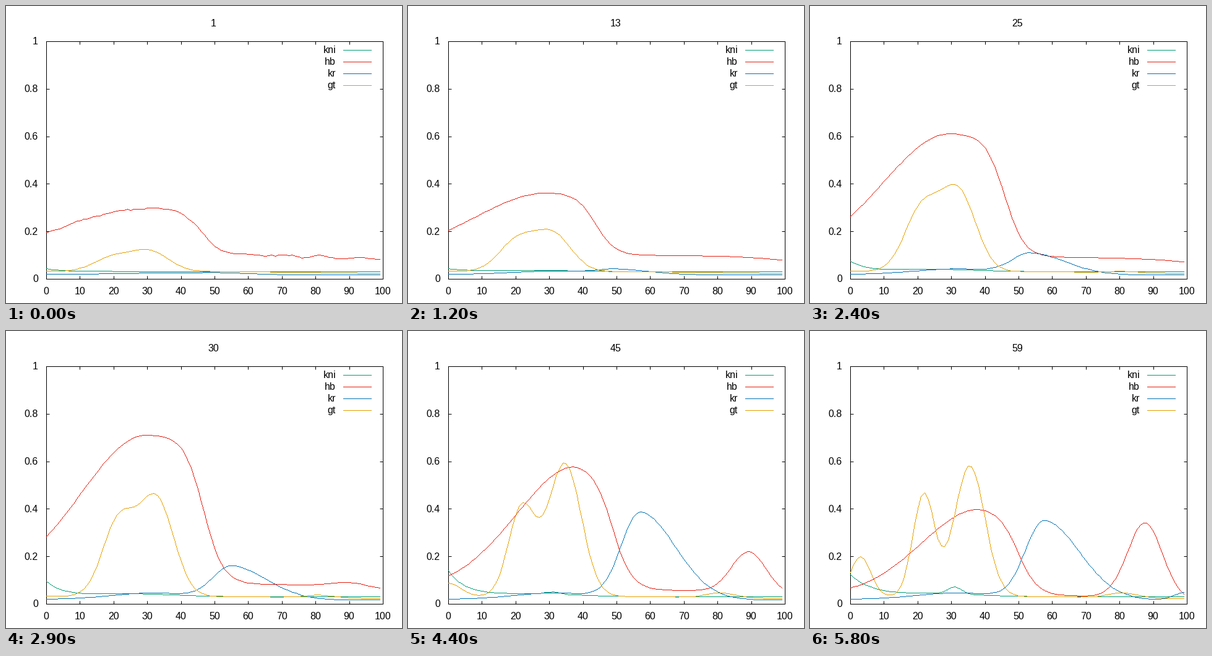
Recreate the animation shown at these times as a matplotlib script. Size 640x480 px, loop 5.9 s.

```python
import numpy as np
import matplotlib.pyplot as plt
from matplotlib.animation import FuncAnimation
from matplotlib.lines import Line2D

W, H, DPI = 640, 480, 100
STEPS, INTERVAL = 59, 100
PX = 72 / DPI
LEFT, RIGHT, TOP, BOTTOM = 65, 609, 57, 441

plt.rcParams.update({"font.family": "Liberation Sans", "font.size": 16 * PX})

X = np.arange(100)
COLORS = {"kni": "#009e73", "hb": "#e51e10", "kr": "#0072b2", "gt": "#e69f00"}

noise = np.random.default_rng(4).normal(0, 0.007, 104)
RIPPLE = np.convolve(noise, np.ones(5) / 5, "valid")


def bell(center, left, right=None):
    """Gaussian hump, optionally with a different width on its right side."""
    width = np.where(X < center, left, left if right is None else right)
    return np.exp(-((X - center) / width) ** 2)


def curves(n):
    """Expression levels along the axis at time step n."""
    def at(*keys):
        return np.interp(n, *zip(*keys))

    # kni: decay from the anterior end, later a small bump at 31
    kni = (0.033 - 0.003 * X / 99
           + at((1, 0.01), (18, 0.012), (39, 0.1), (52, 0.112), (59, 0.09))
           * np.exp(-X / at((39, 4.7), (59, 6.5)))
           + at((1, 0), (30, 0.011)) * bell(25, 18)
           + at((39, 0), (59, 0.03)) * bell(31, 3))

    # hb: broad anterior domain with a sharp border, later a posterior stripe
    rise = bell(at((30, 30), (45, 39)), at((1, 35), (20, 29), (59, 25)), 1e3)
    border = at((1, 46), (13, 43.7), (39, 48.2), (59, 49.7))
    fall = 1 / (1 + np.exp((X - border) / 2.9))
    hb = (at((20, 0.1), (59, 0.035)) - 0.02 * (X / 99) ** 8
          + at((1, 0.2), (13, 0.265), (30, 0.63), (39, 0.6), (59, 0.37))
          * rise * fall
          + at((28, 0), (39, 0.09), (52, 0.265), (59, 0.315))
          * bell(at((39, 90), (59, 87.5)), 7.3)
          + at((1, 1), (13, 0)) * RIPPLE)

    # kr: central domain, steep in front and long behind
    kr = (0.02 - 0.003 * X / 99
          + at((1, 0.006), (30, 0.028)) * bell(32, 18)
          + at((1, 0.007), (19, 0.025), (30, 0.138),
               (39, 0.32), (47, 0.38), (59, 0.33))
          * bell(at((13, 50), (30, 55), (50, 57.5)), 7.8, 15)
          + at((45, 0), (59, 0.034)) * bell(100, 5))

    # gt: one hump that splits into two stripes, plus an anterior tip
    gt = (0.033 - 0.01 * (X / 99) ** 3
          + at((1, 0.06), (13, 0.13), (30, 0.31), (59, 0.43))
          * bell(at((1, 20), (39, 21.8)), at((1, 8), (20, 7.5), (59, 4.5)))
          + at((1, 0.08), (13, 0.15), (30, 0.41), (45, 0.56), (59, 0.55))
          * bell(at((1, 31), (20, 31.3), (52, 35.4)),
                 at((1, 7.8), (39, 7.2), (59, 6.4)))
          + at((39, 0), (52, 0.12), (59, 0.167))
          * bell(at((52, 0), (59, 3)), at((52, 5), (59, 4.2)))
          + at((20, 0), (39, 0.02)) * bell(81, 6))
    return kni, hb, kr, gt


def trace(values):
    """Walk a polyline one pixel at a time, as a plain 1 px line."""
    px = np.rint(LEFT + (RIGHT - LEFT) * X / 100)
    py = np.rint(BOTTOM - (BOTTOM - TOP) * values)
    step = np.maximum(np.diff(px), np.abs(np.diff(py)))
    walk = np.concatenate([[0], np.cumsum(step)])
    k = np.arange(walk[-1] + 1)
    x, y = (np.rint(np.interp(k, walk, p)) for p in (px, py))
    # Offsets keep each point clear of pixel marker rounding.
    return (x + 0.25) / W, 1 - (y + 0.75) / H


fig = plt.figure(figsize=(W / DPI, H / DPI), dpi=DPI, facecolor="white")
ax = fig.add_axes([LEFT / W, 1 - BOTTOM / H,
                   (RIGHT - LEFT) / W, (BOTTOM - TOP) / H])
ax.set(xlim=(0, 100), ylim=(0, 1),
       xticks=range(0, 101, 10), yticks=np.arange(6) / 5)
ax.tick_params(direction="in", length=5 * PX, width=PX, top=True, right=True,
               labelbottom=False, labelleft=False)
for spine in ax.spines.values():
    spine.set_linewidth(PX)


def label(x, y, text, ha):
    return fig.text(x / W, 1 - y / H, text, ha=ha, va="baseline")


for k in range(11):
    label(LEFT + k * (RIGHT - LEFT) / 10, 465.5, str(10 * k), "center")
for k in range(6):
    label(52, BOTTOM - k * (BOTTOM - TOP) / 5 + 5.5, f"{k / 5:g}", "right")

title = label(335.5, 33, "1", "center")
lines = []
for k, (name, color) in enumerate(COLORS.items()):
    y = 71 + 19 * k
    label(533, y + 5, name, "right")
    fig.add_artist(Line2D([545 / W, 590 / W], [1 - y / H] * 2,
                          color=color, lw=PX))
    lines.append(fig.add_artist(Line2D([], [], color=color, ls="none",
                                       marker=",")))


def update(i):
    title.set_text(str(i + 1))
    for line, values in zip(lines, curves(i + 1)):
        line.set_data(*trace(values))
    return [title, *lines]


anim = FuncAnimation(fig, update, frames=STEPS, interval=INTERVAL,
                     repeat=True, repeat_delay=0)
plt.show()
```
